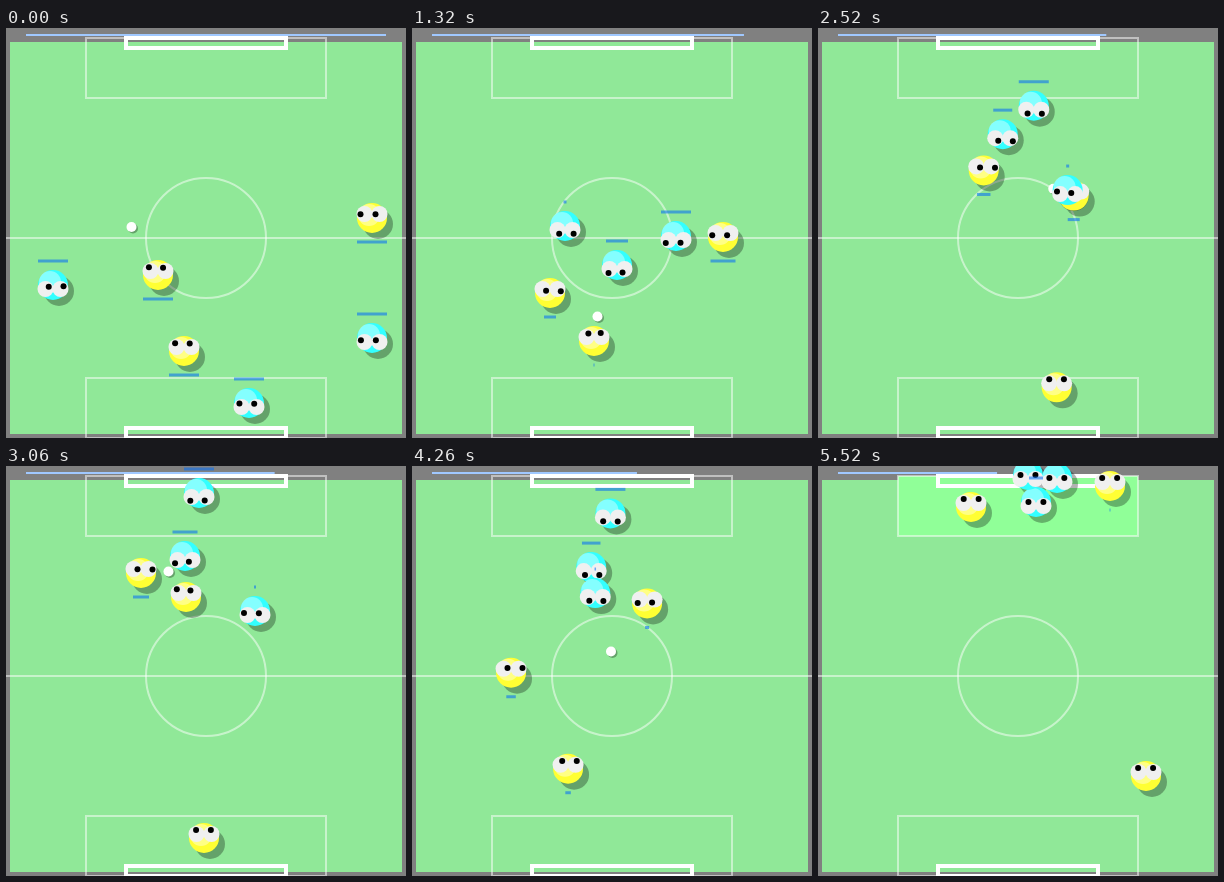
An HTML page with a canvas for the animation above (5550 ms loop, 400x410 px).

```html
<!DOCTYPE html>
<html lang="en">
<head>
<meta charset="utf-8">
<title>Three-a-side football</title>
<style>
  html, body { margin: 0; width: 100%; height: 100%; overflow: hidden; background: #808080; }
  canvas { display: block; }
</style>
</head>
<body>
<canvas id="stage" width="400" height="410"></canvas>
<script>
const LOOP = 5550, STEP = 30, FULL = 30, GOAL_LINE = 12;
const FAINT = 'rgba(255,255,255,.5)', SHADE = 'rgba(0,0,0,.3)';
const ctx = document.getElementById('stage').getContext('2d');

// Everyone passes a key point [x, y, stamina] at each of these times.
const times = [0, 1320, 1980, 3060, 3780, 4740, 5520];
const player = (color, side) => (...path) => ({ color, side, path });
const yellow = player('#ff3', 1), cyan = player('#3ff', -1);

const players = [
  yellow([366, 190, 30], [311, 209, 25], [330, 207, 24], [135 + 45, 131, 0], [185, 145, 7], [285, 115, 1], [292, 20, 1]),
  yellow([152, 247, 30], [138, 265, 12], [181, 202, 11], [135, 107, 16], [75, 199, 6], [134, 182, 13], [153, 41, 0]),
  yellow([178, 323, 30], [182, 313, 1], [257, 333, 0], [198, 372, 0], [125, 303, 1], [213, 312, 10], [328, 310, 0]),
  cyan([47, 257, 30], [153, 198, 3], [183, 135, 13], [179, 90, 25], [160, 108, 25], [203, 85, 12], [218, 36, 14]),
  cyan([366, 310], [264, 208], [241, 144], [193, 27], [184, 60], [217, 28], [239, 12]),
  cyan([243, 375, 30], [205, 237, 22], [236, 183, 4], [249, 145, 2], [186, 114, 1], [192, 128, 2], [210, 9, 3])
];
const ballPath = [[125.5, 199], [185.5, 288.5], [308, 216], [162.5, 105.5], [128, 276], [270, 95], [286, -121]];

function leg(t) {
  let i = 0;
  while (i < times.length - 2 && times[i + 1] <= t) i++;
  return [i, (t - times[i]) / (times[i + 1] - times[i])];
}

const mix = (a, b, k) => a + (b - a) * k;

// Cubic curve through the key points, its slope taken from the neighbours.
function curve(path, axis, i, k) {
  const span = times[i + 1] - times[i];
  const slope = n => {
    const a = Math.max(n - 1, 0), b = Math.min(n + 1, times.length - 1);
    return (path[b][axis] - path[a][axis]) / (times[b] - times[a]) * span;
  };
  const p = path[i][axis], q = path[i + 1][axis], j = 1 - k;
  return p * j * j * (1 + 2 * k) + q * k * k * (3 - 2 * k) + slope(i) * k * j * j - slope(i + 1) * k * k * j;
}

function disc(x, y, r, color) {
  ctx.fillStyle = color;
  ctx.beginPath();
  ctx.arc(x, y, r, 0, Math.PI * 2);
  ctx.fill();
}

function rect(x, y, w, h, color) {
  ctx.fillStyle = color;
  ctx.fillRect(x, y, w, h);
}

function drawPitch(t, scored) {
  rect(0, 0, 400, 410, '#808080');
  rect(4, 14, 392, 392, '#90e898');
  if (scored) rect(80, 10, 240, 60, '#90ff98');
  rect(0, 209, 400, 2, FAINT);
  ctx.strokeStyle = FAINT;
  ctx.lineWidth = 2;
  ctx.beginPath();
  ctx.arc(200, 210, 60, 0, Math.PI * 2);
  ctx.stroke();
  for (const y of [10, 350]) ctx.strokeRect(80, y, 240, 60);
  rect(20, 6, 360 - t * .0364, 2, '#a0c8ff');
  ctx.strokeStyle = '#fff';
  ctx.lineWidth = 4;
  for (const y of [10, 400]) ctx.strokeRect(120, y, 160, 10);
}

function drawPlayer({ x, y, color, side }, ballX, ballY) {
  const eyeY = y - 4 * side, eyes = [x - 7.5, x + 7.5];
  disc(x, y, 15, color);
  disc(x - 3, y - 3, 11, 'rgba(255,255,255,.4)');
  for (const eyeX of eyes) disc(eyeX, eyeY, 8, '#f0f0f0');
  for (const eyeX of eyes) {
    const angle = Math.atan2(ballY - eyeY, ballX - eyeX);
    disc(eyeX + 4 * Math.cos(angle), eyeY + 4 * Math.sin(angle), 3, '#000');
  }
}

function frame(now) {
  const t = Math.floor(now % LOOP / STEP) * STEP;
  const [i, k] = leg(t);
  let [bx, by] = [0, 1].map(axis => mix(ballPath[i][axis], ballPath[i + 1][axis], k));
  const scored = by < GOAL_LINE;
  if (scored) [bx, by] = [200, -1000];

  const poses = players.map(p => {
    const [from = 0, to = 0] = [p.path[i][2] ?? FULL, p.path[i + 1][2] ?? FULL];
    return { ...p, x: curve(p.path, 0, i, k), y: curve(p.path, 1, i, k), stamina: mix(from, to, k) };
  });

  drawPitch(t, scored);
  for (const p of poses) disc(p.x + 6, p.y + 6, 15, SHADE);
  disc(bx + 1.5, by + 1.5, 5, SHADE);
  disc(bx, by, 5, '#fff');
  for (const p of poses) drawPlayer(p, bx, by);
  for (const { x, y, side, stamina } of poses)
    rect(x - stamina / 2, y + 24 * side - 1.5, stamina, 3, 'rgba(10,112,245,.58)');
  requestAnimationFrame(frame);
}
frame(0);
</script>
</body>
</html>
```
